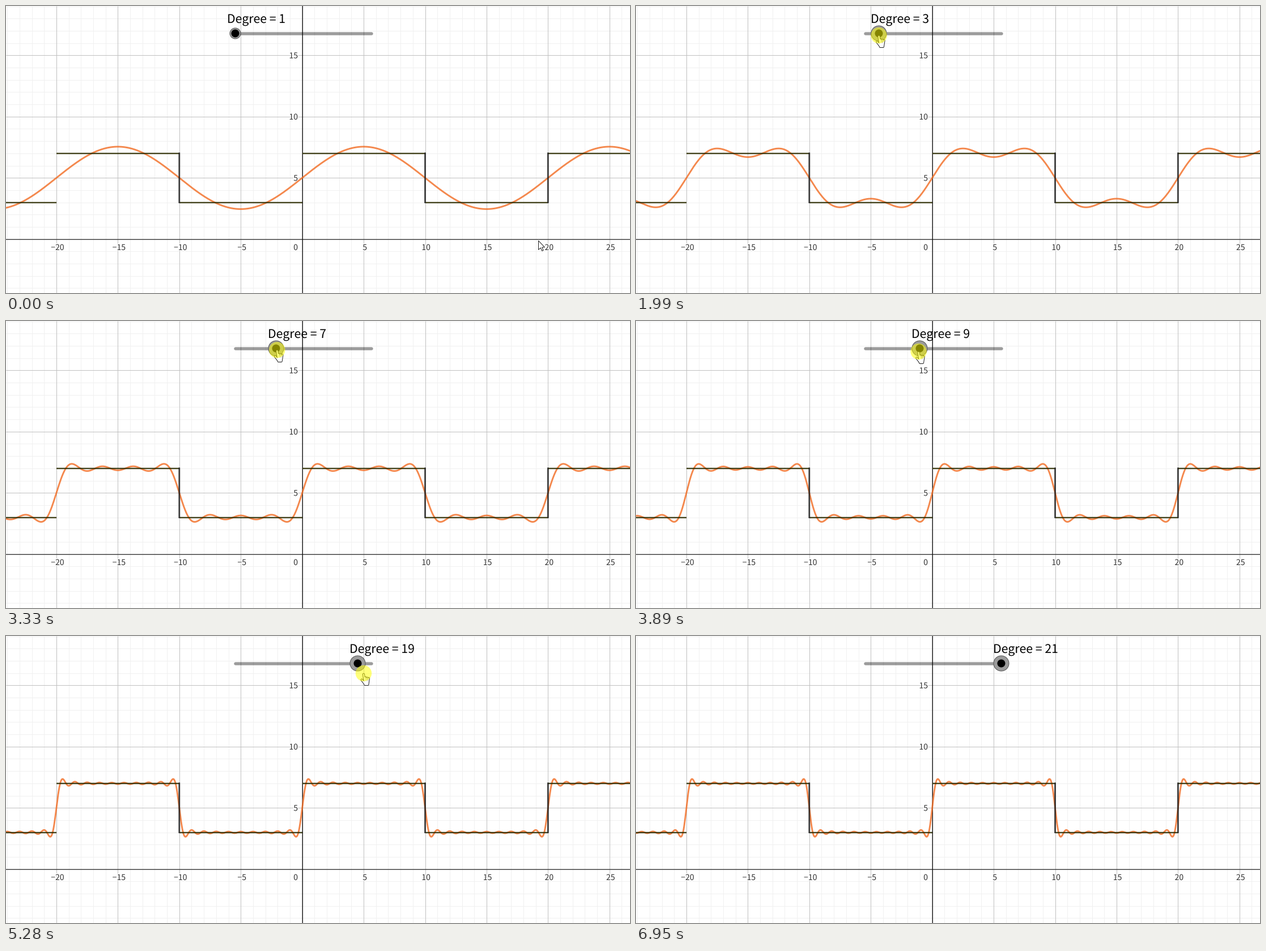
A matplotlib script that plays this animation: 1101 by 508 pixels, repeating every 8.01 s.

```python
import numpy as np
import matplotlib.pyplot as plt
from matplotlib.animation import FuncAnimation
from matplotlib.collections import LineCollection
from matplotlib.patches import Circle, PathPatch, Polygon
from matplotlib.path import Path
from matplotlib.textpath import TextPath

W, H, LOOP, STEP = 1101, 508, 8010, 30
X0, Y0, UNIT = 522.65, 412.65, 21.685
RAIL_X, RAIL_Y, RAIL_LEN = 404.5, 48.5, 240
PX = 0.72  # points per pixel at 100 dpi

# Phases of the pointer: approach, drag, leave
PRESS, RELEASE, GONE = 1230, 5970, 6950
DRAG = [(1230, 399.5, 55.5), (2760, 458, 48.5), (3890, 499, 54),
        (4560, 567, 61), (5280, 631, 66), (5640, 657, 66)]
LEAVE = [(5970, 662, 68), (6730, 1030, 320), (6880, 1016, 479)]

REFRESH = np.concatenate([
    [0], np.arange(60, 821, 76), [PRESS], np.arange(1360, 4661, 70),
    np.arange(4860, 5711, 70), np.linspace(RELEASE, GONE, 14)])

ARROW = np.array([(0, 0), (0, 16), (3.7, 12.5), (6.3, 18), (8.7, 17),
                  (6.2, 11.6), (11, 11.5)])


def sx(x):
    return X0 + UNIT * np.asarray(x)


def sy(y):
    return Y0 - UNIT * np.asarray(y)


def text_path(s, x, baseline, size, align):
    """Outline of s whose ink starts, centres or ends at x (align 0, .5, 1)."""
    path = TextPath((0, 0), s, size=size, prop=dict(family="Noto Sans CJK JP"))
    box = path.get_extents()
    left = x - box.x0 - align * box.width
    return Path(path.vertices * [1, -1] + [left, baseline], path.codes)


def hand_strokes():
    """Four fingers and a thumb that meet at the wrist, as one broken line."""
    tops = [(0, 1.8)] + [(3 * i, 7 + 0.6 * i) for i in (1, 2, 3)]
    lines = [[top, (2.5 + 1.6 * i, 20)] for i, top in enumerate(tops)]
    lines.append([(-3.3, 11.5), (2.5, 19)])
    return np.array([p for line in lines for p in (*line, (np.nan, np.nan))])


def along(keys, t):
    times, xs, ys = np.transpose(keys)
    return np.array([np.interp(t, times, xs), np.interp(t, times, ys)])


def pointer(t):
    if t < PRESS:
        u = np.clip(t / 820, 0, 1)
        u = u * u * (3 - 2 * u)
        return np.array([939.5, 415.5]) * (1 - u) + np.array([381.5, 54.5]) * u
    return along(DRAG if t < RELEASE else LEAVE, t)


def degree_at(t):
    if t < PRESS:
        return 1
    x = along(DRAG, t)[0]
    return int(np.clip(1 + 2 * round((x - RAIL_X) / 24), 1, 21))


fig = plt.figure(figsize=(W / 100, H / 100), dpi=100, facecolor="white")
ax = fig.add_axes([0, 0, 1, 1])
ax.set(xlim=(0, W), ylim=(H, 0))
ax.axis("off")


def grid(every, color):
    xs = [n for n in range(-24, 27) if n % every == 0]
    ys = [n for n in range(-4, 20) if n % every == 0]
    lines = [[(sx(n), 0), (sx(n), H)] for n in xs]
    lines += [[(0, sy(n)), (W, sy(n))] for n in ys]
    ax.add_collection(LineCollection(lines, colors=color, linewidths=PX, zorder=1))


def stroke(xs, ys, color, width, z, **kw):
    return ax.plot(xs, ys, color=color, lw=width * PX, zorder=z, **kw)[0]


grid(1, "#f0f0f0")
grid(5, "#c0c0c0")
stroke([0, W], [Y0 + 0.6] * 2, "#383838", 1.4, 2, snap=False)
stroke([X0 + 0.6] * 2, [0, H], "#101010", 1.4, 2, snap=False)

labels = [text_path(str(n).replace("-", "\u2212"), sx(n) + 1.9, 432, 14, 0.5)
          for n in range(-20, 26, 5) if n]
labels += [text_path(str(n), 514.3, sy(n) + 5.2, 14, 1) for n in (5, 10, 15)]
labels.append(text_path("0", 514.3, 432, 14, 1))
ticks = Path.make_compound_path(*labels)
ax.add_patch(PathPatch(ticks, fc="white", ec="white", lw=3 * PX, zorder=3))
ax.add_patch(PathPatch(ticks, fc="#303030", lw=0, zorder=3))

# Square wave: ten units high, ten units low
for start in range(-30, 30, 10):
    level = 7 if start % 20 == 0 else 3
    stroke(sx([start, start + 10]), sy([level, level]), "#2b2b00", 2.4, 6,
           alpha=0.88, solid_capstyle="butt")
for x in (-10, 10, 20):
    stroke(sx([x, x]), sy([7, 3]), "#202020", 2.8, 6, alpha=0.86, snap=False)

pixels = np.linspace(-3, W + 3, 1108)
units = (pixels - X0) / UNIT


def partial_sum(degree):
    k = np.arange(1, degree + 1, 2)[:, None]
    return 5 + 8 / np.pi * (np.sin(k * np.pi * units / 10) / k).sum(axis=0)


curve = stroke(pixels, sy(partial_sum(1)), "#f26a20", 2.9, 5, alpha=0.8)

# Slider
stroke([RAIL_X, RAIL_X + RAIL_LEN], [RAIL_Y, RAIL_Y], "black", 5.5, 7,
       alpha=0.39, solid_capstyle="round")
knob = ax.add_patch(Circle((RAIL_X, RAIL_Y), 10, fc="#9b9b9b", ec="#555555",
                           lw=PX, zorder=8))
dot = ax.add_patch(Circle((RAIL_X, RAIL_Y), 7, fc="black", lw=0, zorder=9))
titles = {d: text_path(f"Degree = {d}", RAIL_X + 12 * (d - 1) - 12.3, 30, 21.2, 0)
          for d in range(1, 22, 2)}
title = ax.add_patch(PathPatch(titles[1], fc="black", lw=0, zorder=10))

# Pointer
HAND = hand_strokes()
arrow = ax.add_patch(Polygon(ARROW, fc="white", ec="#202020", lw=PX, zorder=11))
hand = [stroke(*HAND.T, color, width, 11, solid_capstyle="round")
        for color, width in (("#202020", 4.2), ("white", 2.2))]
glow = ax.add_patch(Circle((0, 0), 14.2, fc="#ffff00", alpha=0.52, lw=0, zorder=12))


def draw(frame):
    t = REFRESH[REFRESH <= frame * STEP + 20][-1]
    degree = degree_at(t)
    curve.set_ydata(sy(partial_sum(degree)))
    title.set_path(titles[degree])

    center = (RAIL_X + 12 * (degree - 1), RAIL_Y)
    knob.set_center(center)
    dot.set_center(center)
    knob.set_radius(9.5 if t < PRESS else 13.5)

    pos = pointer(t)
    pressed = PRESS <= t < RELEASE
    arrow.set_visible(not pressed and t < GONE)
    arrow.set_xy(ARROW + pos)
    glow.set_center(pos)
    for layer in hand:
        layer.set_data(*(HAND + pos).T)
    for part in (glow, *hand):
        part.set_visible(pressed)
    return []


anim = FuncAnimation(fig, draw, frames=LOOP // STEP, interval=STEP,
                     init_func=lambda: draw(0), repeat=True, repeat_delay=0,
                     blit=False)
plt.show()
```
